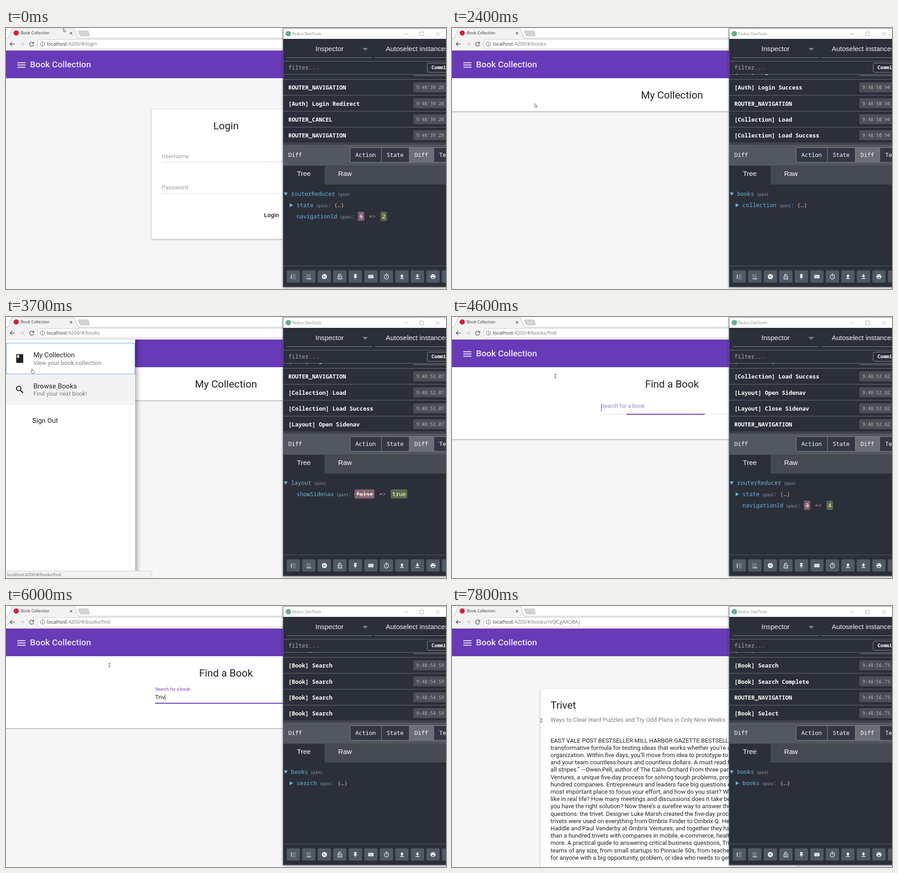
Recreate the animation shown at these times as an HTML page. Size 971 by 577 pixels, loop 8000 ms.

```html
<!DOCTYPE html>
<html lang="en">
<head>
<meta charset="utf-8">
<title>Book Collection</title>
<style>
html, body { margin: 0; width: 100%; height: 100%; overflow: hidden; background: #f6f6f6; }
svg { display: block; width: 971px; height: 577px; }
text { white-space: pre; }
.r { font-family: Roboto, sans-serif; }
.o { font-family: "Open Sans", sans-serif; }
.a { font-family: "Liberation Sans", Arial, sans-serif; }
.m { font-family: "Noto Sans Mono", monospace; }
.card { fill: #fff; filter: drop-shadow(0 1px 1.5px rgba(0,0,0,.4)); }
.nav { fill: #fff; filter: drop-shadow(3px 0 6px rgba(0,0,0,.4)); }
.win { filter: drop-shadow(0 1px 2px rgba(0,0,0,.5)); }
</style>
</head>
<body>
<svg viewBox="0 0 971 577">
  <defs><clipPath id="list"><rect x="611" y="102.5" width="360" height="154"/></clipPath></defs>
  <g id="page"></g>
  <g id="chrome"></g>
  <g id="tools"></g>
  <g id="log" clip-path="url(#list)"></g>
  <g id="tree"></g>
  <g id="mouse"></g>
</svg>
<script>
const LOOP = 8000, STEP = 100;
const $ = id => document.getElementById(id);
const INK = '#212121', GREY = '#7d7d7d', PURPLE = '#673ab7', DARK = '#2a2f3a';

// drawing helpers
const text = (x, y, s, size, fill = INK, font = 'r', more = '') =>
  `<text class="${font}" x="${x}" y="${y}" font-size="${size}" fill="${fill}" ${more}>${s}</text>`;
const rect = (x, y, w, h, fill, more = '') =>
  `<rect x="${x}" y="${y}" width="${w}" height="${h}" fill="${fill}" ${more}/>`;
const path = (d, stroke, w = 1, fill = 'none', more = '') =>
  `<path d="${d}" stroke="${stroke}" stroke-width="${w}" fill="${fill}" ${more}/>`;
const circle = (x, y, r, fill, more = '') => `<circle cx="${x}" cy="${y}" r="${r}" fill="${fill}" ${more}/>`;
const at = (x, y, s) => `<g transform="translate(${x} ${y})">${s}</g>`;
const lines = (x, y, pitch, list) => list.map((s, i) => text(x, y + i * pitch, s, 13.2)).join('');
const MID = 'text-anchor="middle"', BOLD = 'font-weight="700"', MEDIUM = 'font-weight="500"';

const pen = document.createElement('canvas').getContext('2d');
function widthOf(s, size) {
  pen.font = `${size}px Roboto, sans-serif`;
  return pen.measureText(s).width;
}

// timing helpers
const clamp = v => Math.max(0, Math.min(1, v));
const easeOut = (t, start, span, power) => 1 - (1 - clamp((t - start) / span)) ** power;
const latest = (t, table) => table.filter(row => row[0] <= t).pop();
const typed = (t, word, times) => word.slice(0, times.filter(v => v <= t).length);

const TITLE = 'Trivet';
const TAGLINE = 'Ways to Clear Hard Puzzles and Try Odd Plans in Only Nine Weeks';
const BLURB = [
  'EAST VALE POST BESTSELLER MILL HARBOR',
  'GAZETTE BESTSELLER “Trivet offers a transformative',
  'formula for testing ideas that works whether you’re at a',
  'startup or a large organization. Within five days, you’ll',
  'move from idea to prototype to decision, savin...'];
const BLURB_2 = ['Bereskan Tugas Rumit', 'Cukup dalam 9 Pekan', 'pekerjaan atau proyek',
  'cemerlang. Namun sering', 'kali tak mudah. Sebab'];
const STORY = [
  'EAST VALE POST BESTSELLER MILL HARBOR GAZETTE BESTSELLER',
  'transformative formula for testing ideas that works whether you’re at a',
  'organization. Within five days, you’ll move from idea to prototype to decision',
  'and your team countless hours and countless dollars. A must read for',
  'all stripes.” —Owen Pell, author of The Calm Orchard From three partners',
  'Ventures, a unique five-day process for solving tough problems, proven',
  'hundred companies. Entrepreneurs and leaders face big questions every',
  'most important place to focus your effort, and how do you start? What',
  'like in real life? How many meetings and discussions does it take before',
  'you have the right solution? Now there’s a surefire way to answer these',
  'questions: the trivet. Designer Luke Marsh created the five-day process',
  'trivets were used on everything from Ombrix Finder to Ombrix Q. He joined',
  'Haddle and Paul Venderby at Ombrix Ventures, and together they have',
  'than a hundred trivets with companies in mobile, e-commerce, healthcare',
  'more. A practical guide to answering critical business questions, Trivet',
  'teams of any size, from small startups to Pinnacle 50s, from teachers',
  'for anyone with a big opportunity, problem, or idea who needs to get'];

const SEARCH = '[Book] Search', ROUTER = 'ROUTER_NAVIGATION';
const ACTIONS = ['@@INIT', ROUTER, '[Auth] Login Redirect', 'ROUTER_CANCEL', ROUTER,
  '[Auth] Login', '[Auth] Login Success', ROUTER, '[Collection] Load', '[Collection] Load Success',
  '[Layout] Open Sidenav', '[Layout] Close Sidenav', ROUTER,
  ...Array(6).fill(SEARCH), '[Book] Search Complete', ROUTER, '[Book] Select'];

// tree rows: root, then [key, value] or [key, before, after]
const route = (a, b) => ['routerReducer', ['state'], ['navigationId', a, b]];
const books = (...keys) => ['books', ...keys.map(k => [k])];
const layout = (a, b) => ['layout', ['showSidenav', a, b]];
// time, number of actions, stamp, tree
const STORE = [
  [0, 5, '39.28', route('1', '2')],
  [1900, 10, '50.94', books('collection')],
  [2900, 11, '52.07', layout('false', 'true')],
  [3900, 12, '52.80', layout('true', 'false')],
  [4000, 13, '52.82', route('3', '4')],
  [5200, 14, '53.70', books('search')],
  [5400, 15, '53.98', books('search')],
  [5600, 16, '54.20', books('search')],
  [6000, 17, '54.59', books('search')],
  [6300, 18, '54.88', books('search')],
  [6500, 19, '55.08', books('search')],
  [7000, 20, '56.06', books('search', 'books')],
  [7700, 22, '56.73', books('books')]];

const PAGES = [[0, 'login', 'login'], [1800, 'books', 'books'], [3900, 'books', 'books/find'],
  [4000, 'find', 'books/find'], [7600, 'book', 'books/rV0JCgAAQBAJ']];

// time, x, y, shape
const MOVES = [[0, 126.5, 0, 'arrow'], [500, 271, 182, 'arrow'], [600, 271, 182, 'arrow'],
  [900, 350, 304, 'beam'], [1800, 350, 300, 'arrow'], [2300, 350, 300, 'arrow'],
  [2400, 182.5, 166.5, 'arrow'], [2700, 34, 80, 'hand'], [3300, 34, 80, 'hand'],
  [3700, 57.5, 114, 'hand'], [3900, 85, 158, 'hand'], [4000, 88, 158, 'arrow'],
  [4500, 228, 130.5, 'beam'], [7000, 228, 130.5, 'beam'], [7100, 228, 134, 'beam'],
  [7400, 199, 318, 'arrow'], [7600, 198, 318, 'arrow'], [7800, 197, 253, 'beam'], [LOOP, 197, 253, 'beam']];

const SHAPES = {
  arrow: path('M0 .4V8.6L2 6.8 3.3 9.6 4.6 9 3.4 6.3H6Z', '#333', .7, '#fff'),
  beam: path('M-2.5-4H-.6L0-3.5.6-4H2.5M-2.5 4H-.6L0 3.5.6 4H2.5M0-3.5V3.5', '#333', .9),
  hand: path('M-.8 5.5V.8Q0-.3.8.8V4L4 4.8Q5 5 5 6V8L4 10.5H-.3L-3 7Q-3 5.5-1.8 6.2L-.8 7Z', '#333', .7, '#fff')
};

// text field with floating label; p floats the label, q grows the underline
function field(x, y, label, value, p, q, caret) {
  const mid = x + 142.5, half = 142.5 * q;
  const tone = p > .5 ? PURPLE : p > 0 ? '#9a86c4' : '#9e9e9e';
  const end = x + widthOf(value, 13.2);
  return rect(x, y - .5, 285, 1, '#dcdcdc') +
    (q > 0 ? rect(mid - half, y - 1, half * 2, 2, PURPLE) : '') +
    text(x, y - 8.5 - 20 * p, label, 13.2 - 3.3 * p, tone) +
    text(x, y - 8.7, value, 13.2) +
    (caret ? rect(end + .2, y - 21, .9, 15, '#333') : '');
}

const floatAt = (t, start) => [easeOut(t, start, 400, 3), easeOut(t, start, 300, 6.5)];

function bookCard(x, y, tag, blurb, authors) {
  return rect(x, 285, 380, 285, '#fff', 'class="card" rx="1"') +
    text(x + 23.5, 329, TITLE, 22.7) + text(x + 23.5, 359, tag, 13.2, GREY) +
    lines(x + 23.5, y, 16.25, blurb) +
    text(x + 39.5, 504, 'Written By:', 12.4, INK, 'r', BOLD) +
    text(x + 24, 542, authors, 15.1);
}

const cover = at(385, 300, rect(0, 0, 57, 76, '#10b3da') + circle(11.5, 8, 6, '#1d2a33') +
  path('M5 21L53 8V28L5 41Z', 'none', 0, '#f2d34a') +
  path('M6 48L48 40V44L6 52ZM6 55L40 49V52L6 58Z', 'none', 0, '#d5f2f5') +
  path('M48 76L57 67V76Z', 'none', 0, '#f4f4f4'));

const views = {
  login(t) {
    const name = typed(t, 'tes', [1300, 1400, 1600]);
    return rect(321, 179.5, 329, 287, '#fff', 'class="card" rx="1"') +
      text(485.5, 224, 'Login', 22.7, INK, 'r', MID) +
      field(343.5, 296, 'Username', name, ...floatAt(t, 960), t >= 1000) +
      field(343.5, 365.5, 'Password', '', 0, 0, false) +
      text(569.5, 418, 'Login', 13.2, INK, 'r', MEDIUM);
  },
  books: () => rect(-4, 111, 980, 73, '#fff', 'class="card"') +
    text(485.5, 155.5, 'My Collection', 22.7, INK, 'r', MID),
  find(t) {
    const found = t >= 7000, dx = found ? -6.5 : 0;
    const word = typed(t, TITLE, [5100, 5400, 5600, 6000, 6300, 6500]);
    let s = rect(-4, 111, 980, 159, '#fff', 'class="card"') +
      text(485.5 + dx, 155.5, 'Find a Book', 22.7, INK, 'r', MID) +
      field(329 + dx, 215, 'Search for a book', word, ...floatAt(t, 4560), t >= 4600 && !found);
    if (found) s += bookCard(85.5, 404, TAGLINE.slice(0, 38) + '...', BLURB,
      'Luke Marsh, Paul Venderby, and Corwin Haddle') + cover +
      bookCard(493.5, 395, '', BLURB_2, 'Luke Marsh');
    return s;
  },
  book: () => rect(195, 183, 568, 420, '#fff', 'class="card"') +
    text(217.5, 227, TITLE, 22.7) + text(217.5, 256, TAGLINE, 13.2, GREY) +
    lines(217.5, 301.6, 16.2, STORY)
};

function header() {
  return rect(0, 50, 971, 61, PURPLE) +
    path('M25 76.7H43M25 81.7H43M25 86.7H43', '#f0eaf8', 2) +
    text(53, 87, 'Book Collection', 19.1, '#eee8f7', 'r', MEDIUM);
}

function sidenav(t) {
  const open = t < 3900 ? easeOut(t, 2750, 450, 2.5) : 1 - clamp((t - 3900) / 300) ** .8;
  if (open <= 0) return '';
  const hover = t < 3300 || t > 4000 ? 0 : t < 3700 ? 1 : 2;
  const status = hover === 2 ? 'localhost:4200/#/books/find' : 'localhost:4200/#/';
  return at(285 * (open - 1), 0, rect(-20, 30, 305, 570, '#fff', 'class="nav"') +
    (hover ? rect(0, 58 + 68.3 * (hover - 1), 285, 68.3, '#f3f3f3') : '') +
    path('M.5 57.9H284.5V126H.5Z', '#5a9bf0', 1) +
    path('M24 82H36.5Q38 82 38 83.5V100Q38 101.5 36.5 101.5H24Q22.5 101.5 22.5 100V83.5Q22.5 82 24 82Z', 'none', 0, INK) +
    path('M24.5 83.8H29V91L26.8 89.5 24.5 91Z', 'none', 0, '#fff') +
    text(60.5, 89.3, 'My Collection', 15.1) + text(60.5, 106, 'View your book collection', 13.2, GREY) +
    circle(28, 158, 5, 'none', `stroke="${INK}" stroke-width="2.1"`) + path('M31.7 161.7L37.5 167.5', INK, 2.6) +
    text(60.5, 157.6, 'Browse Books', 15.1) + text(60.5, 174.4, 'Find your next book!', 13.2, GREY) +
    text(58, 234, 'Sign Out', 15.1)) +
    (hover ? path('M-1 561.5H319Q322 561.5 322 564.5V578H-1Z', '#cfcfcf', 1, '#f2f2f2') +
      text(2, 572.5, status, 9.1, '#666', 'o') : '');
}

function chrome(url) {
  return rect(0, 0, 971, 22, '#fff') + rect(0, 22, 971, 28, '#f2f2f2') +
    path('M0 22.5H3Q5.5 22 6.5 19L13 2Q14 0 16 0H148Q150 0 151 2L158 19Q159 22 162 22.5H971', '#b9b9b9', 1, '#f2f2f2') +
    path('M160 6H179Q181 6 182 8L184 16Q184.500 18 182.500 18H166Q164 18 163 16L159 8Q158.500 6 160 6Z', '#bdbdbd', .8, '#d4d4d4') +
    circle(22.5, 11, 5.7, '#dd1b35') +
    text(33, 14.3, 'Book Collection', 8.7, '#333', 'o') +
    path('M141 9L146 14M146 9L141 14', '#555', 1.1) +
    path('M19 35.5H9M13.5 31L9 35.500 13.500 40', '#555', 1.3) +
    path('M30 35.5H40M35.5 31L40 35.500 35.500 40', '#ccc', 1.3) +
    path('M60 32.7A4.600 4.600 0 1 0 61 36.500M61.2 30.5V34H57.5', '#555', 1.3) +
    rect(70.5, 25.5, 920, 20.5, '#fff', 'rx="2" stroke="#cfcfcf"') +
    circle(80.5, 35.5, 4.7, 'none', 'stroke="#555"') + path('M80.5 35V38.200M80.5 32.800V34', '#555', 1.1) +
    text(90, 39.3, `localhost<tspan fill="#777">:4200/#/${url}</tspan>`, 10.7, '#333', 'o') +
    rect(0, 49, 971, 1, '#d0d0d0');
}

const ICONS = [
  path('M-4.500-4.500V5', '#fff', 1.4) + path('M-1.500-4H5M-1.500-1H5M-1.500 2H5M-1.500 5H5', '#fff', 1.1, 'none', 'stroke-dasharray="1.2 1.3"'),
  path('M-5 5H5', '#fff', 1.4) + path('M-5-4H5M-5-1H5M-5 2H5', '#fff', 1.1, 'none', 'stroke-dasharray="1.2 1.3"'),
  circle(0, 0, 5.6, '#fff') + path('M-1.500-2.500V2.500M1.500-2.500V2.500', '#4f5a65', 1.4),
  path('M-4-1H4V5.300H-4ZM-2.300-1V-3.200Q-2.300-5.400 0-5.400T2.300-3.200', '#fff', 1.2) + circle(0, 2.200, 1.1, '#fff'),
  path('M-3-5.500H3V-4.500H2.200V-1L3.500 1V2H.6V6H-.6V2H-3.500V1L-2.200-1V-4.500H-3Z', 'none', 0, '#fff'),
  rect(-5.7, -3.8, 11.4, 7.6, '#fff', 'rx="1"') + path('M-4.500-1.700H5M-4.500.200H5M-2.500 2.200H2.500', '#4f5a65', .9, 'none', 'stroke-dasharray="1.1 .8"'),
  circle(0, .8, 4.6, 'none', 'stroke="#fff" stroke-width="1.2"') + path('M-1.800-5.700H1.800M0-1.800V1.300M3.600-3.800L4.600-2.800', '#fff', 1.2),
  path('M0-5L4-1H1.500V2.500H-1.500V-1H-4ZM-4 3.600H4V4.900H-4Z', 'none', 0, '#fff'),
  path('M0 2.500L4-1.500H1.500V-5H-1.500V-1.500H-4ZM-4 3.600H4V4.900H-4Z', 'none', 0, '#fff'),
  path('M-3.500-5H3.500V-3H-3.500ZM-5.500-2.300H5.500V2.500H3.500V5H-3.500V2.500H-5.500Z', 'none', 0, '#fff') + rect(-2.3, 1, 4.6, 2.8, '#4f5a65'),
  ''];

function tools() {
  const tab = (x, s) => text(x, 285, s, 12.5, '#fff', 'm');
  return rect(611, 0, 380, 573, DARK, 'class="win"') + rect(611, 0, 360, 24, '#fff') +
    path('M611.500 573V.5H971M611.500 572.500H971', '#6d7078', 1) +
    circle(623, 12.5, 6, '#64ad8b') + text(631.5, 16.3, 'Redux DevTools', 8.7, '#8a8a8a', 'o') +
    path('M878 13H887M913 9H921V17H913ZM949 9L957 17M957 9L949 17', '#a0a0a0', .9) +
    text(683, 51, 'Inspector', 15.1, '#f2f2f2', 'a') + text(838, 51, 'Autoselect instances', 15.1, '#f2f2f2', 'a') +
    path('M786.500 44H799L792.750 50.500Z', 'none', 0, '#777c86') +
    path('M620 65.500H808M814 65.500H971', '#868a91', 1) +
    path('M612 73.500H971M612 102.500H971', '#686c74', 1) +
    text(623, 92, 'filter...', 12.5, '#a9abb0', 'm') +
    rect(929.5, 77.5, 60, 20.5, DARK, 'rx="3" stroke="#8d9096"') +
    text(939, 91.3, 'Commit', 10.6, '#fff', 'm', BOLD) +
    rect(612, 257, 359, 47.5, '#53575e') + text(623, 285, 'Diff', 12.5, '#fff', 'm') +
    rect(759.5, 264.5, 230, 32.5, '#323743', 'rx="3" stroke="#8a8d93"') +
    rect(890, 265, 54, 31.5, '#6a6e75') +
    path('M828.500 264.500V297M890 264.500V297M944 264.500V297', '#8a8d93', 1) +
    tab(771, 'Action') + tab(840, 'State') + tab(901.5, 'Diff') + tab(956, 'Test') +
    rect(703, 304.5, 268, 41.5, '#454950') +
    text(642, 327, 'Tree', 15.1, '#fff', 'a') + text(733, 327, 'Raw', 15.1, '#fff', 'a') +
    path('M612 526H971', '#5d6169', 1) +
    ICONS.map((icon, i) => at(634 + 34.25 * i, 549.5,
      rect(-14.7, -13.7, 29.4, 27, '#4f5a65', 'rx="2.5"') + icon)).join('');
}

function log(count, stamp) {
  let s = '';
  for (let k = 0; k < 5; k++) {
    const y = 242 - 35.25 * k;
    const sec = count === 5 && k === 0 ? '39.29' : stamp;
    s += text(623, y, ACTIONS[count - 1 - k], 12.5, '#fff', 'm', 'font-weight="600"') +
      rect(899, y - 16, 90, 22, '#4b4e55', 'rx="3"') +
      text(905.5, y - .9, '9:48:' + sec, 10.2, '#b5b6b9', 'm') +
      rect(612, y + 12, 359, 1, '#6c7077');
  }
  return s;
}

function tree([root, ...rows]) {
  const BLUE = '#6fb3d2', W = 7.5;
  const pin = (x, y) => text(x, y, '(pin)', 8.7, '#a9abaf', 'm');
  const chip = (x, y, s, fill, more = '') => rect(x, y - 15, s.length * W + 6.7, 20.5, fill, 'rx="3"') +
    text(x + 3.4, y, s, 12.5, '#fff', 'm', more);
  let s = path('M613 363.500H621.500L617.250 371Z', 'none', 0, BLUE) +
    text(629, 370.7, root, 12.5, BLUE, 'm') + pin(629 + root.length * W + 6, 370.7);
  rows.forEach(([key, before, after], i) => {
    const y = 396 + 25 * i, px = 641 + key.length * W + 6, vx = px + 39.5;
    s += text(641, y, key, 12.5, BLUE, 'm') + pin(px, y) + text(px + 25.5, y, ':', 12.5, BLUE, 'm');
    if (!before) {
      s += path(`M626 ${y - 8.5}V${y}L633.500 ${y - 4.2}Z`, 'none', 0, BLUE) +
        text(vx, y, '{…}', 12.5, '#deaf8f', 'm');
      return;
    }
    const ax = vx + before.length * W + 17;
    s += chip(vx, y, before, '#825f6d', 'text-decoration="line-through"') +
      text(ax, y, '=&gt;', 12.5, '#d381c3', 'm') + chip(ax + 25.5, y, after, '#5a6b47');
  });
  return s;
}

function mouse(t) {
  const i = MOVES.findIndex(m => m[0] > t), [t0, x0, y0, shape] = MOVES[i - 1], [t1, x1, y1] = MOVES[i];
  const p = (t - t0) / (t1 - t0);
  // a click changes the page in place, without a glide
  const glide = t0 === 900 ? 0 : p;
  return at(x0 + (x1 - x0) * glide, y0 + (y1 - y0) * glide, SHAPES[shape]);
}

function render(t) {
  const [, view, url] = latest(t, PAGES), [, count, stamp, rows] = latest(t, STORE);
  $('page').innerHTML = rect(0, 50, 971, 527, '#f6f6f6') + views[view](t) + header() + sidenav(t);
  $('chrome').innerHTML = chrome(url);
  $('log').innerHTML = log(count, stamp);
  $('tree').innerHTML = tree(rows);
  $('mouse').innerHTML = mouse(t);
}

$('tools').innerHTML = tools();
let shown = -1;
const begin = performance.now();
function tick() {
  const t = Math.floor((performance.now() - begin) % LOOP / STEP) * STEP;
  if (t !== shown) render(shown = t);
  requestAnimationFrame(tick);
}
tick();
</script>
</body>
</html>
```
